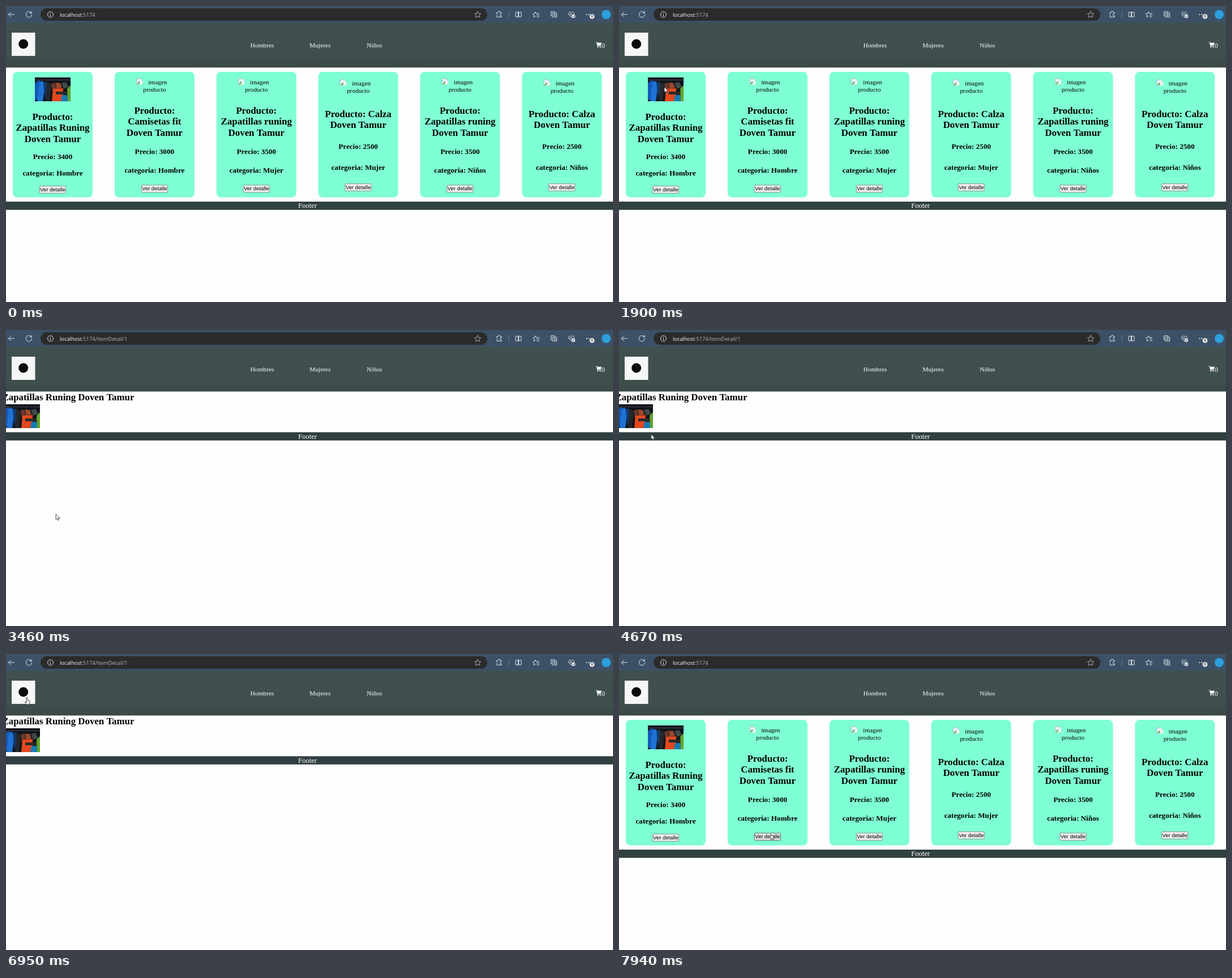
These frames come from a looping animation (1072x522 px, 8000 ms). An HTML page with a canvas:

```html
<!DOCTYPE html>
<html lang="es">
<head>
<meta charset="utf-8">
<title>Tienda</title>
<style>
  html, body { margin: 0; width: 100%; height: 100%; overflow: hidden; background: #fff; }
  canvas { display: block; }
</style>
</head>
<body>
<canvas id="stage" width="1072" height="522"></canvas>
<script>
const ctx = document.getElementById('stage').getContext('2d');
const LOOP = 8000;
const SERIF = '"Liberation Serif", serif';
const SANS = '"Liberation Sans", sans-serif';
const UI = '"Open Sans", sans-serif';
const BRAND = 'Doven Tamur';

const CARDS = [
  { title: ['Zapatillas Runing', BRAND], price: 3400, group: 'Hombre', photo: true },
  { title: ['Camisetas fit', BRAND], price: 3000, group: 'Hombre' },
  { title: ['Zapatillas runing', BRAND], price: 3500, group: 'Mujer' },
  { title: [BRAND], price: 2500, group: 'Mujer', short: true },
  { title: ['Zapatillas runing', BRAND], price: 3500, group: 'Niños' },
  { title: [BRAND], price: 2500, group: 'Niños', short: true }
];

// Baselines and button top for each kind of card
const LAYOUTS = {
  photo: { title: 201, price: 269.5, group: 299, button: 317 },
  long: { alt: 138, title: 190, price: 261, group: 294, button: 315.5 },
  short: { alt: 140, title: 195.5, price: 251.5, group: 288.5, button: 313 }
};

// Pointer moves, each advancing in discrete steps
const MOVES = [
  { start: 410, end: 690, steps: 5, from: [833, 495], to: [424, 356], appears: true },
  { start: 1020, end: 1770, steps: 12, from: [424, 356], to: [70, 102] },
  { start: 1840, end: 1840, steps: 1, from: [70, 102], to: [69, 95] },
  { start: 1900, end: 1900, steps: 1, from: [69, 95], to: [80, 143] },
  { start: 1980, end: 2640, steps: 11, from: [80, 143], to: [83, 294] },
  { start: 2710, end: 2970, steps: 5, from: [83, 294], to: [88, 325] },
  { start: 4250, end: 5010, steps: 12, from: [88, 325], to: [38, 99] },
  { start: 5080, end: 5550, steps: 8, from: [38, 99], to: [37, 76] },
  { start: 7270, end: 7940, steps: 11, from: [37, 76], to: [268, 318] }
];

const between = (t, a, b) => t >= a && t < b;
const ease = p => p * p * (3 - 2 * p);
const cardCenter = i => 82.5 + 179.85 * i;

function pointerAt(t) {
  const move = MOVES.filter(m => t >= m.start).pop();
  if (!move) return null;
  const { start, end, steps, from, to, appears } = move;
  const done = t >= end ? steps : 1 + Math.floor((t - start) / (end - start) * (steps - 1));
  const p = ease(appears ? (done - 1) / (steps - 1) : done / steps);
  return { x: from[0] + (to[0] - from[0]) * p, y: from[1] + (to[1] - from[1]) * p };
}

function box(x, y, w, h, color) {
  ctx.fillStyle = color;
  ctx.fillRect(x, y, w, h);
}

function rounded(x, y, w, h, r, color) {
  ctx.fillStyle = color;
  ctx.beginPath();
  ctx.roundRect(x, y, w, h, r);
  ctx.fill();
}

function disc(x, y, r, color) {
  ctx.fillStyle = color;
  ctx.beginPath();
  ctx.arc(x, y, r, 0, Math.PI * 2);
  ctx.fill();
}

function text(str, x, y, font, color = '#000', align = 'left') {
  ctx.font = font;
  ctx.fillStyle = color;
  ctx.textAlign = align;
  ctx.fillText(str, x, y);
}

function shape(path, x, y, { fill, stroke, width = 1, scale = 1 }) {
  const p = new Path2D(path);
  ctx.save();
  ctx.translate(x, y);
  ctx.scale(scale, scale);
  ctx.lineWidth = width;
  ctx.lineJoin = ctx.lineCap = 'round';
  if (fill) { ctx.fillStyle = fill; ctx.fill(p); }
  if (stroke) { ctx.strokeStyle = stroke; ctx.stroke(p); }
  ctx.restore();
}

function drawToolbar(detail) {
  const icon = (path, x, color = '#dfe4e9') => shape(path, x, 15, { stroke: color });
  const star = 'M0-5.5L1.7-1.8 5.6-1.4 2.7 1.3 3.5 5.2 0 3.2-3.5 5.2-2.7 1.3-5.6-1.4-1.7-1.8Z';
  box(0, 0, 1072, 29, '#3c5167');
  rounded(61, 4, 789, 22, 11, '#2b2b2b');
  icon('M5 0H-5M-1-4L-5 0-1 4', 9.5);
  icon('M4.3-3A5.2 5.2 0 1 0 5.2 0M4.7-5.5V-2.5H1.7', 40.5);
  icon('M5 0A5 5 0 1 1-5 0A5 5 0 1 1 5 0M0-.5V2.6M0-2.5V-2.4', 78.5);
  text('localhost', 95, 18.5, '9.3px ' + UI, '#fff');
  const hostWidth = ctx.measureText('localhost').width;
  text(':5174' + (detail ? '/itemDetail/1' : ''), 95 + hostWidth, 18.5, '9.3px ' + UI, '#b5b5b5');
  icon(star, 833, '#a9a9a9');
  icon('M-4-3.5H-1.5A1.8 1.8 0 1 1 2-3.5H4V-1A1.8 1.8 0 1 0 4 2V4.5H-4V2A1.8 1.8 0 0 0-4-1Z', 871);
  box(887.5, 10, 1, 11, '#71808f');
  icon('M-1-4H-5V4H-1ZM1-4H5V4H1ZM0-5V5', 905);
  icon('M-1.5-4.5L0-1.8H5M-1.5-4.5L-3-1.6-6-1.2-3.8 1-4.4 4.5-1.5 3M1 1H5M1 4H5', 936.5);
  icon('M-2-2.5H5V4.5H-2ZM-4 2.5H-5V-5H2V-4M1.5-1V3M-.5 1H3.5', 967.5);
  icon('M0 4.5L-4.6 0C-6-4-2-6 0-3C2-6 6-4 4.6 0M-4 0H-2L-.5-2 1 1H3', 998.5);
  disc(1002, 18, 3.3, '#dfe4e9');
  shape('M-1.5 0L-.3 1.2 1.7-1', 1002, 18, { stroke: '#3c5167' });
  for (const x of [1025.5, 1029.5]) disc(x, 15, 1, '#fff');
  disc(1035, 18.5, 4.3, '#f2f2f2');
  shape('M0 2.2V-2M-1.5-.5L0-2 1.5-.5', 1035, 18.5, { stroke: '#333' });
  disc(1060, 15, 8, '#2c9fdc');
}

function drawHeader() {
  const shade = ctx.createLinearGradient(0, 29, 0, 108);
  shade.addColorStop(0, '#3f504f');
  shade.addColorStop(0.8, '#3f4f4d');
  shade.addColorStop(1, '#3a4947');
  box(0, 29, 1072, 79.5, shade);
  box(10, 47, 41.5, 41, '#f5f6f5');
  disc(30.7, 67, 8.5, '#0b0b0b');
  const font = '11.4px ' + SERIF;
  text('Hombres', 431.5, 73, font, '#fff');
  text('Mujeres', 536, 73, font, '#fff');
  text('Niños', 637, 73, font, '#fff');
  shape('M0 0H2L2.4 1.2H10.3L9 6H3.6L3.8 7H9V8H3L1.4 1H0Z', 1041.5, 63.5, { fill: '#fff' });
  disc(1045.3, 72.5, 1, '#fff');
  disc(1049.7, 72.5, 1, '#fff');
  text('0', 1052, 73.5, '11.6px ' + SERIF, '#fff');
}

function drawFooter(y) {
  box(0, y, 1072, 14.5, '#303f40');
  text('Footer', 532.5, y + 11.4, '12.7px ' + SERIF, '#fff', 'center');
}

function drawPhoto(x, y) {
  ctx.save();
  ctx.beginPath();
  ctx.rect(x, y, 63, 42);
  ctx.clip();
  box(x, y, 63, 42, '#10141a');
  const garments = [
    ['M0 10L7 5 12 9 5 38 0 40Z', '#1459b8'],
    ['M8 8L13 6 18 12 14 42H4Z', '#1e72d2'],
    ['M15 9L20 7 23 14 18 40Z', '#123a70'],
    ['M21 8L29 12 26 42H20Z', '#25282a'],
    ['M29 11L36 9 37 20 31 25Z', '#6d382b'],
    ['M37 9L45 10 48 18 38 20Z', '#9b482d'],
    ['M32 20L50 19 49 42H30Z', '#e4481e'],
    ['M47 10L55 8 60 17 51 20Z', '#3e4a48'],
    ['M48 31H57L59 42H46Z', '#167bb4'],
    ['M57 20L63 14V42H58Z', '#62a52b']
  ];
  for (const [path, fill] of garments) shape(path, x, y, { fill });
  box(x + 37, y + 25, 20, 5, '#292b2b');
  box(x, y + 4, 63, 1, '#494c4d');
  ctx.restore();
}

function drawMissingImage(cx, y) {
  const x = cx - 32, top = y - 10.5;
  shape('M.5.5H7.5L10.5 3.5V10.5H.5Z', x, top, { fill: '#e8f1fb', stroke: '#a6adb2', width: 0.8 });
  shape('M1 10L4.5 5.5 7 8 5 10Z', x, top, { fill: '#58a846' });
  shape('M3 10.8L10.8 4V10.8Z', x, top, { fill: '#f5f5f5' });
  text('imagen', cx + 5.5, y, '11.3px ' + SERIF, '#000', 'center');
  text('producto', cx, y + 13, '11.3px ' + SERIF, '#000', 'center');
}

function drawButton(cx, y, pointer, pressed) {
  const x = cx - 23.5;
  const hover = pointer && between(pointer.x, x, x + 47) && between(pointer.y, y, y + 13.5);
  const [fill, line] = !hover ? ['#efefef', '#767676']
    : pressed ? ['#f5f5f5', '#8d8d8d'] : ['#e0e0e0', '#4f4f4f'];
  rounded(x, y, 47, 13.5, 2, line);
  rounded(x + 0.8, y + 0.8, 45.4, 11.9, 1.3, fill);
  text('Ver detalle', cx, y + 9.7, '9.4px ' + SANS, '#000', 'center');
}

function drawCard(card, i, pointer, pressed) {
  const cx = cardCenter(i);
  const at = LAYOUTS[card.photo ? 'photo' : card.short ? 'short' : 'long'];
  rounded(cx - 70.5, 116, 141, 221.5, 8, '#7fffd4');
  if (card.photo) drawPhoto(51, 126);
  else drawMissingImage(cx, at.alt);
  const lines = [card.short ? 'Producto: Calza' : 'Producto:', ...card.title];
  lines.forEach((line, n) =>
    text(line, cx, at.title + n * 19.3, 'bold 16.9px ' + SERIF, '#000', 'center'));
  const small = 'bold 13.15px ' + SERIF;
  text('Precio: ' + card.price, cx, at.price, small, '#000', 'center');
  text('categoria: ' + card.group, cx, at.group, small, '#000', 'center');
  drawButton(cx, at.button, pointer, pressed);
}

function drawDetail() {
  text('Zapatillas Runing ' + BRAND, -6.5, 124, 'bold 16.85px ' + SERIF);
  drawPhoto(-3, 131);
  drawFooter(180.3);
}

function drawPointer({ x, y }, pressed) {
  if (pressed) disc(x, y + 0.5, 8, 'rgba(255, 214, 50, 0.65)');
  const overLogo = between(x, 10, 51) && between(y, 47, 88);
  const arrow = 'M0 0V9.3L2.2 7.2 3.8 10.7 5.3 10 3.8 6.7H6.7Z';
  const hand = 'M-.8 0Q0-1 .8 0V4L4.6 5Q5.2 5.3 5 7L4.2 12H-.5L-3.4 8Q-3.6 6.6-2.2 7L-.8 8.2Z';
  shape(overLogo ? hand : arrow, x, y + (overLogo ? 1 : 0),
    { fill: '#fff', stroke: '#222', width: 0.8 });
}

function draw(t) {
  const detail = between(t, 3460, 7020);
  const pressed = between(t, 3190, 3460) || between(t, 6750, 6950);
  const pointer = pointerAt(t);
  box(0, 0, 1072, 522, '#fefefe');
  drawToolbar(detail);
  drawHeader();
  if (detail) {
    drawDetail();
  } else {
    CARDS.forEach((card, i) => drawCard(card, i, pointer, pressed));
    drawFooter(345);
  }
  if (pointer) drawPointer(pointer, pressed);
}

const began = performance.now();
function tick() {
  draw((performance.now() - began) % LOOP);
  requestAnimationFrame(tick);
}
tick();
</script>
</body>
</html>
```
